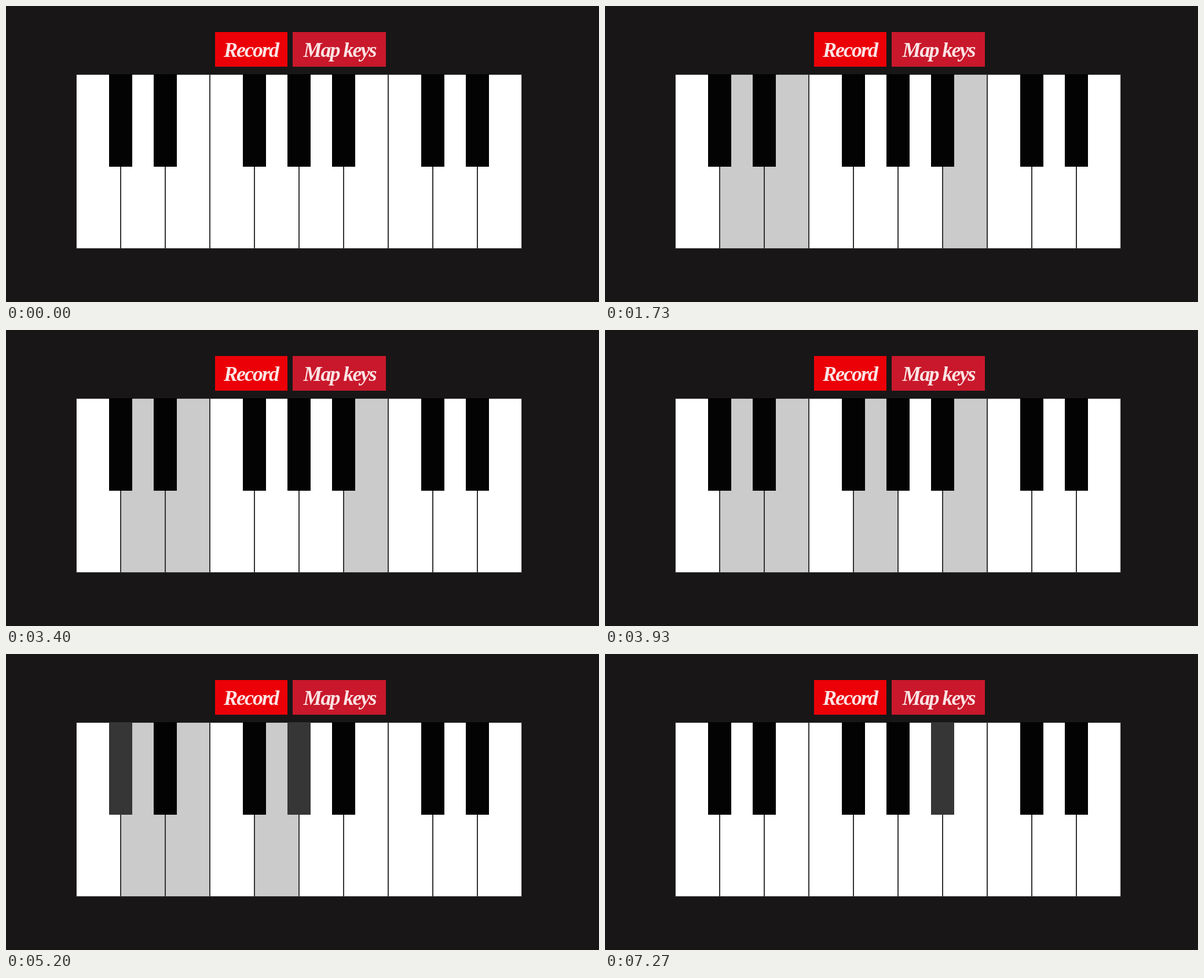
These frames come from a looping animation (1024 by 512 pixels, 7470 ms). An HTML page:

```html
<!DOCTYPE html>
<html lang="en">
<head>
<meta charset="utf-8">
<title>Piano</title>
<style>
  html, body { margin: 0; height: 100%; overflow: hidden; background: #181617; }
  svg { display: block; width: 100%; height: 100%; }
  text { font: italic bold 36px "Liberation Serif", serif; letter-spacing: -2px; fill: #fbe3e4; text-anchor: middle; }
  .white { fill: #fff; stroke: #333; }
  .black { fill: #030303; }
  .white.down { fill: #cbcbcb; }
  .black.down { fill: #363636; }
</style>
</head>
<body>
<svg viewBox="0 0 1024 512">
  <rect x="361" y="45" width="125" height="60" fill="#eb0007"/>
  <text x="423" y="88">Record</text>
  <rect x="495" y="45" width="161" height="60" fill="#c9182b"/>
  <text x="576" y="88">Map keys</text>
  <g id="keys"></g>
</svg>
<script>
const LOOP = 7470, PITCH = 77;
const board = document.getElementById("keys");

function addKey(kind, x, y, width, height) {
  const key = document.createElementNS("http://www.w3.org/2000/svg", "rect");
  const attrs = { class: kind, x, y, width, height };
  for (const name in attrs) key.setAttribute(name, attrs[name]);
  return board.appendChild(key);
}

const white = Array.from({ length: 10 }, (_, i) =>
  addKey("white", 121.5 + PITCH * i, 118.5, PITCH - 1, 301));

// A black key is stored under the index of the white key on its left.
const black = {};
for (const i of [0, 1, 3, 4, 5, 7, 8])
  black[i] = addKey("black", 178 + PITCH * i, 118, 40, 160);

// Each note: key, time pressed, time released (ms)
const notes = [
  [white[6], 1070, 5000],
  [white[1], 1330, 5270],
  [white[2], 1670, 6600],
  [white[4], 3600, 5330],
  [black[0], 4670, 7000],
  [black[4], 5200, 7200],
  [black[5], 5870, LOOP],
];

function draw(now) {
  const t = now % LOOP;
  for (const [key, press, release] of notes)
    key.classList.toggle("down", t >= press && t < release);
  requestAnimationFrame(draw);
}
draw(performance.now());
</script>
</body>
</html>
```
